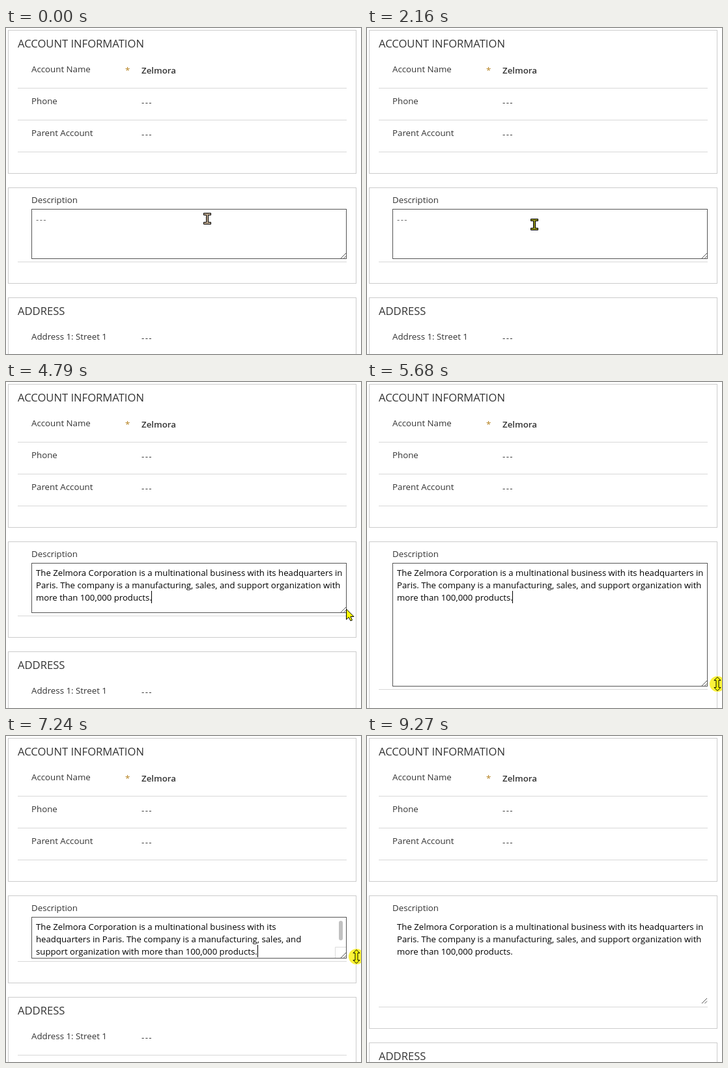
These frames come from a looping animation (545x501 px, 9470 ms). An HTML page:

```html
<!DOCTYPE html>
<html lang="en">
<head>
<meta charset="utf-8">
<title>Resizable description field</title>
<style>
  html, body { margin: 0; width: 100%; height: 100%; overflow: hidden; background: #fff; }
  svg { display: block; width: 545px; height: 501px; }
  text { font: 13.3px "Open Sans", "Noto Sans", sans-serif; fill: #333; white-space: pre; }
  .head { font-size: 16.6px; }
  .value { font-weight: 600; }
  .dash { letter-spacing: 1.4px; }
  .note text { font-size: 13.2px; fill: #000; }
  .card { fill: none; stroke: #ccc; }
  .rule { stroke: #d8d8d8; }
  .grip { stroke: #555; fill: none; }
  .pointer path { fill: #ff0; stroke: #000; }
</style>
</head>
<body>
<svg viewBox="0 0 545 501">
  <defs><clipPath id="clip"><rect id="clipBox" x="40" y="279" width="482"/></clipPath></defs>

  <rect class="card" x="3.5" y="3.5" width="534" height="220"/>
  <text class="head" x="18" y="30">ACCOUNT INFORMATION</text>
  <text x="39" y="68">Account Name</text>
  <text x="183" y="70" style="fill:#b5811f">*</text>
  <text class="value" x="208" y="70">Zelmora</text>
  <text x="39" y="117">Phone</text>
  <text class="dash" x="208" y="119">---</text>
  <text x="39" y="166">Parent Account</text>
  <text class="dash" x="208" y="168">---</text>
  <path class="rule" d="M18 92.5H523M18 141.5H523M18 190.5H523"/>

  <rect class="card" id="noteCard" x="3.5" y="245.5" width="534"/>
  <text x="39" y="269">Description</text>
  <rect id="box" x="39.5" y="278.5" width="483" fill="none" stroke="#555"/>
  <g class="note" clip-path="url(#clip)">
    <text class="dash" id="empty" x="46" y="299" style="fill:#666">---</text>
    <g id="wide">
      <text x="46" y="298">The Zelmora Corporation is a multinational business with its headquarters in</text>
      <text x="46" y="317">Paris. The company is a manufacturing, sales, and support organization with</text>
      <text x="46" y="336">more than 100,000 products.</text>
    </g>
    <g id="narrow">
      <text x="46" y="298">The Zelmora Corporation is a multinational business with its</text>
      <text x="46" y="317">headquarters in Paris. The company is a manufacturing, sales, and</text>
      <text x="46" y="336">support organization with more than 100,000 products.</text>
      <rect x="511" y="284" width="6" height="30" rx="3" fill="#c1c1c1"/>
    </g>
    <rect id="caret" width="1" height="19"/>
  </g>

  <g id="below">
    <path id="corner" d="M505.5 354V337.5H522" fill="#fff" stroke="#dcdcdc"/>
    <path class="grip" d="M514 354L522 346M518.5 354L522 350.5"/>
    <path class="rule" d="M18 359.5H523M18 503.5H523"/>
    <rect class="card" x="3.5" y="414.5" width="534" height="300"/>
    <text class="head" x="18" y="441">ADDRESS</text>
    <text x="39" y="479">Address 1: Street 1</text>
    <text class="dash" x="208" y="481">---</text>
  </g>

  <g class="pointer" id="pointer">
    <circle id="glow" r="12" fill="#fbf23c"/>
    <path id="beam" d="M-5.5 -8.5H5.5V-5.5H1.5V5.5H5.5V8.5H-5.5V5.5H-1.5V-5.5H-5.5Z"/>
    <path id="arrow" d="M.5 0V16L4.3 12.5L7 18L9.5 17L7 11.5H12Z"/>
    <path id="sizer" d="M0 -10.5L5 -5.5H2V5.5H5L0 10.5L-5 5.5H-2V-5.5H-5Z"/>
  </g>
</svg>
<script>
const LOOP = 9470, FRAME = 73, BLINK = 530, LAG = 70;
const CLICK = 2380, PASTE = 3460, PRESS = 4790, RELEASE = 8010, GONE = 8330, BLUR = 9270;

// Pointer moves; lift bends the path upwards.
const home = { x: 309, y: 293 };
const moves = [
  { from: 390, to: 2160, x: 257, y: 302, lift: 205 },
  { from: 3990, to: 4530, x: 522, y: 349 },
  { from: PRESS, to: 5680, x: 538, y: 464 },
  { from: 5750, to: 5810, x: 540, y: 467 },
  { from: 6020, to: 6630, x: 528, y: 334 },
  { from: 6630, to: 6830, x: 538, y: 334 },
  { from: 7030, to: 7930, x: 539, y: 406 },
  { from: RELEASE, to: GONE, x: 552, y: 505 },
];

const $ = id => document.getElementById(id);
const show = (id, on) => { $(id).style.display = on ? "" : "none"; };
const clamp = (v, lo, hi) => Math.min(hi, Math.max(lo, v));
const ease = k => k * k * (3 - 2 * k);

// Motion advances in whole frames, as in a screen recording.
function snap(t) {
  const m = moves.find(m => t >= m.from && t < m.to);
  if (!m) return t;
  const span = m.to - m.from, step = span / Math.round(span / FRAME);
  return m.from + Math.floor((t - m.from) / step + 0.05) * step;
}

function pointerAt(t) {
  let { x, y } = home;
  for (const m of moves) {
    const k = clamp((t - m.from) / (m.to - m.from), 0, 1);
    x += (m.x - x) * ease(k);
    y += (m.y - y) * ease(k) - (m.lift || 0) * Math.sin(Math.PI * k ** 0.6);
  }
  return { x: Math.round(x), y: Math.round(y) };
}

// The caret restarts its blinking on a click, a paste and a second press.
function caretOn(t) {
  const since = [6160, PASTE, CLICK].find(s => t >= s);
  return t < BLUR && Math.floor((t - since) / BLINK) % 2 === 0;
}

function draw(t) {
  const now = snap(t);
  const { x, y } = pointerAt(now);
  const edge = pointerAt(clamp(now - LAG, PRESS, RELEASE)).y + 6;
  const typed = t >= PASTE, tight = edge < 350;
  const inside = y >= 278 && y <= edge && x < 508;
  const dragging = now > PRESS && t < RELEASE;

  show("box", t < CLICK ? inside : t < BLUR);
  $("box").setAttribute("height", edge - 279);
  $("clipBox").setAttribute("height", edge - 279);
  $("noteCard").setAttribute("height", edge - 208);
  $("below").setAttribute("transform", `translate(0 ${edge - 355})`);

  show("empty", t < CLICK);
  show("wide", typed && !tight);
  show("narrow", typed && tight);
  show("corner", typed && tight);
  show("caret", caretOn(t));
  $("caret").setAttribute("x", !typed ? 46 : tight ? 386 : 223);
  $("caret").setAttribute("y", typed ? 321 : 283);

  show("pointer", t < GONE);
  $("pointer").setAttribute("transform", `translate(${x} ${y})`);
  show("glow", dragging || (t >= CLICK && t < CLICK + 140));
  show("sizer", dragging);
  show("beam", !dragging && inside);
  show("arrow", !dragging && !inside);
  $("beam").style.fill = t < moves[0].from ? "#b9a58d" : "#8f8f1a";
}

const start = performance.now();
function tick() {
  draw((performance.now() - start) % LOOP);
  requestAnimationFrame(tick);
}
tick();
</script>
</body>
</html>
```
